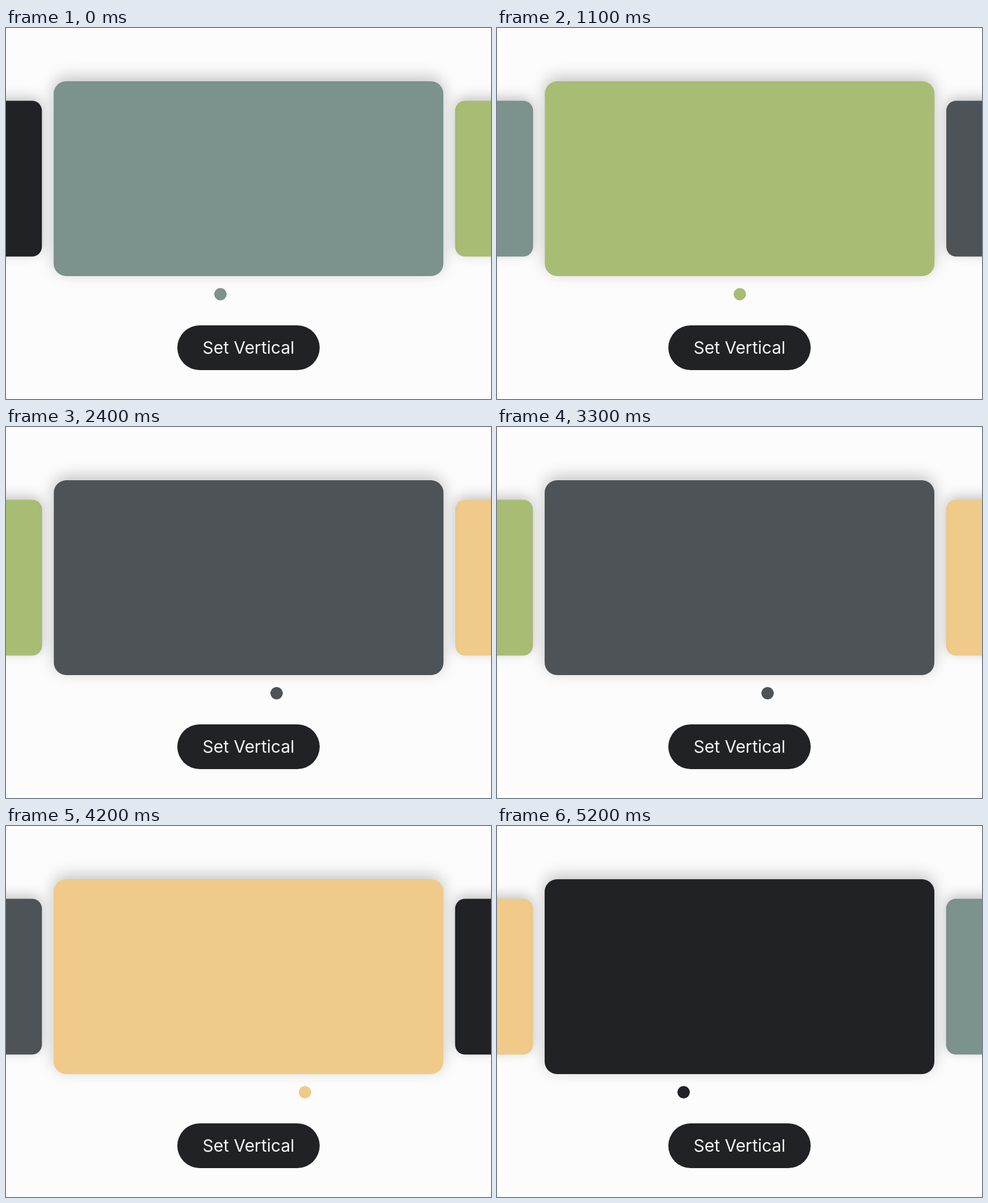
An HTML page that plays this animation: 855 by 655 pixels, repeating every 5.3 s.

```html
<!DOCTYPE html>
<html lang="en">
<head>
<meta charset="utf-8">
<title>Carousel</title>
<style>
  html, body { margin: 0; width: 100%; height: 100%; overflow: hidden; background: #fcfcfc; }
  #stage { position: relative; width: 855px; height: 655px; overflow: hidden; background: #fcfcfc; }
  .card {
    position: absolute; left: 84px; top: 94px; width: 687px; height: 344px;
    border-radius: 22px; box-shadow: 0 -7px 28px rgba(0, 0, 0, .23);
  }
  .dot {
    position: absolute; top: 459px; width: 22px; height: 22px;
    border-radius: 50%; overflow: hidden;
  }
  .dot i { display: block; width: 22px; height: 22px; border-radius: 50%; }
  .button {
    position: absolute; z-index: 20; left: 302px; top: 525px; width: 251px; height: 79px;
    border-radius: 40px; background: #212225; color: #f6f6f6; text-align: center;
    font: 400 30px/79px Inter, Roboto, sans-serif;
  }
</style>
</head>
<body>
<div id="stage"><div class="button">Set Vertical</div></div>
<script>
  const COLORS = ['#212225', '#7c928c', '#a8bc74', '#4d5356', '#efca89'];
  const COUNT = COLORS.length;
  const LOOP = 5300, STEP = 100;
  const STARTS = [886, 2186, 3447, 4687];
  const SLIDE = 250;      // length of one slide
  const DOT_LAG = 4;      // dots trail the cards slightly
  const NEAR = 639, FAR = 855, DOT = 22, DOT_GAP = 49.5;

  const stage = document.getElementById('stage');

  function add(parent, tag, className) {
    const el = document.createElement(tag);
    el.className = className;
    return parent.appendChild(el);
  }

  const items = COLORS.map((color, i) => {
    const card = add(stage, 'div', 'card');
    const dot = add(stage, 'div', 'dot');
    const fill = add(dot, 'i', '');
    card.style.background = fill.style.background = color;
    dot.style.left = 317.5 + i * DOT_GAP + 'px';
    return { card, fill };
  });

  const clamp = v => Math.min(1, Math.max(0, v));
  const easeOutQuart = u => 1 - (1 - u) ** 4;

  function position(t) {
    return STARTS.reduce((sum, s) => sum + easeOutQuart(clamp((t - s) / SLIDE)), 1);
  }

  // signed distance of an item from the active slot, around the ring
  function distance(i, pos) {
    const half = COUNT / 2;
    return (((i - pos + half) % COUNT) + COUNT) % COUNT - half;
  }

  function draw(t) {
    const pos = position(t), dotPos = position(t - DOT_LAG);
    items.forEach(({ card, fill }, i) => {
      const d = distance(i, pos), a = Math.abs(d);
      const x = Math.sign(d) * (Math.min(a, 1) * NEAR + Math.max(a - 1, 0) * FAR);
      card.style.transform = `translateX(${x}px) scale(${1 - 0.2 * Math.min(a, 1)})`;
      card.style.zIndex = 10 - Math.round(a * 3);
      const shift = Math.max(-1, Math.min(1, distance(i, dotPos)));
      fill.style.transform = `translateX(${-DOT * shift}px)`;
      fill.style.visibility = Math.abs(shift) > 0.99 ? 'hidden' : 'visible';
    });
  }

  const begin = performance.now();
  function tick() {
    const t = (performance.now() - begin) % LOOP;
    draw(Math.floor(t / STEP) * STEP);
    requestAnimationFrame(tick);
  }
  tick();
</script>
</body>
</html>
```
